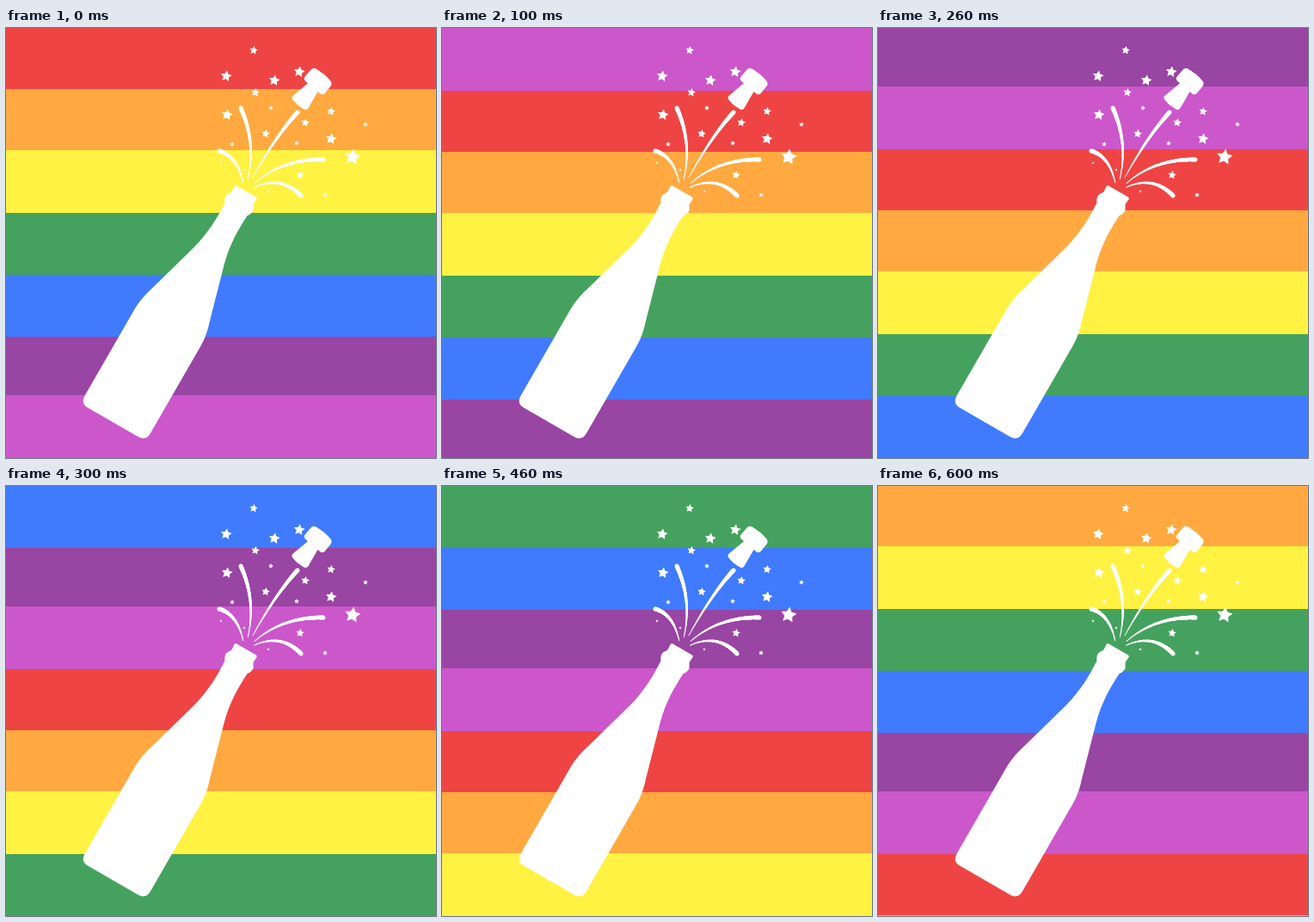
An HTML page with a canvas that plays this animation: 500 by 500 pixels, repeating every 700 ms.

```html
<!DOCTYPE html>
<html lang="en">
<head>
<meta charset="utf-8">
<title>Rainbow bottle</title>
<style>
html, body { margin: 0; width: 100%; height: 100%; overflow: hidden; }
canvas { display: block; width: 100%; height: 100%; }
</style>
</head>
<body>
<canvas id="stage" width="500" height="500"></canvas>
<script>
const ctx = document.getElementById('stage').getContext('2d');
const SIZE = 500;
const STEP = 100;
const MOUTH = { x: 278, y: 190 };

// colour and height of each stripe, top to bottom
const stripes = [
  ['#ef4444', 71], ['#ffa940', 71], ['#fff242', 73], ['#44a25e', 72],
  ['#407bff', 72], ['#9945a3', 68], ['#cb57cb', 73]
];

// right halves, mirrored about their own upright axis
const bottle = new Path2D(`M-1 0 H13 Q15 0 15 2 L14.5 9 L18 15 Q18.5 20 15 24
  C14 45 14 62 20 86 L38 150 Q44 168 44 182 V299 Q44 310 34 310 H-1 Z`);
const cork = new Path2D(`M-1 -1 Q6 -1 11 0 Q15 1 15 5 V15 Q15 19 11 19 H7.5
  L11.5 41 Q12 44 9 45 Q4 46 -1 46 Z`);

// bend and tip of each jet
const jets = [
  [269, 149, 248, 143], [291, 133, 273, 93], [314, 125, 339, 98],
  [322, 152, 369, 153], [320, 171, 343, 195]
];

// star centres by radius
const stars = [
  { r: 9.6, at: [[403, 150]] },
  { r: 6.7, at: [[256, 56], [312, 61], [341, 51], [257, 101], [378, 129]] },
  { r: 5, at: [[288, 26], [290, 75], [302, 123], [348, 110], [378, 97], [342, 171]] },
  { r: 3, at: [[308, 93], [338, 134], [263, 135], [371, 194], [418, 112]] },
  { r: 1.7, at: [[250, 157], [277, 165], [305, 190]] }
];

function mirrored(half, x, y, degrees) {
  for (const side of [1, -1]) {
    ctx.save();
    ctx.translate(x, y);
    ctx.rotate(degrees * Math.PI / 180);
    ctx.scale(side, 1);
    ctx.fill(half);
    ctx.restore();
  }
}

function star(x, y, r) {
  ctx.beginPath();
  for (let i = 0; i < 10; i++) {
    const a = .15 + i * Math.PI / 5;
    const d = i % 2 ? r * .5 : r;
    ctx.lineTo(x + d * Math.sin(a), y - d * Math.cos(a));
  }
  ctx.fill();
}

// a curve that leaves the mouth thin and ends in a round tip
function jet(bendX, bendY, tipX, tipY) {
  const mix = (a, b, t) => a + (b - a) * t;
  const curve = (a, b, c, t) => mix(mix(a, b, t), mix(b, c, t), t);
  const x = mix(MOUTH.x, bendX, .25);
  const y = mix(MOUTH.y, bendY, .25);
  for (let t = 0; t <= 1; t += 1 / 128) {
    ctx.beginPath();
    ctx.arc(curve(x, bendX, tipX, t), curve(y, bendY, tipY, t), mix(.5, 2.5, t), 0, Math.PI * 2);
    ctx.fill();
  }
}

function drawStripes(shift) {
  const n = stripes.length;
  let y = -Math.floor(shift / 5);
  for (let i = n - shift; y < SIZE; i++) {
    const [color, height] = stripes[i % n];
    ctx.fillStyle = color;
    ctx.fillRect(0, y, SIZE, height);
    y += height;
  }
}

function draw(time) {
  drawStripes(Math.floor(time / STEP) % stripes.length);
  ctx.fillStyle = '#fff';
  mirrored(bottle, 279.5, 190, 30);
  mirrored(cork, 369, 54.5, 40);
  jets.forEach(j => jet(...j));
  stars.forEach(({ r, at }) => at.forEach(([x, y]) => star(x, y, r)));
}

const start = performance.now();
function tick() {
  draw(performance.now() - start);
  requestAnimationFrame(tick);
}
tick();
</script>
</body>
</html>
```
